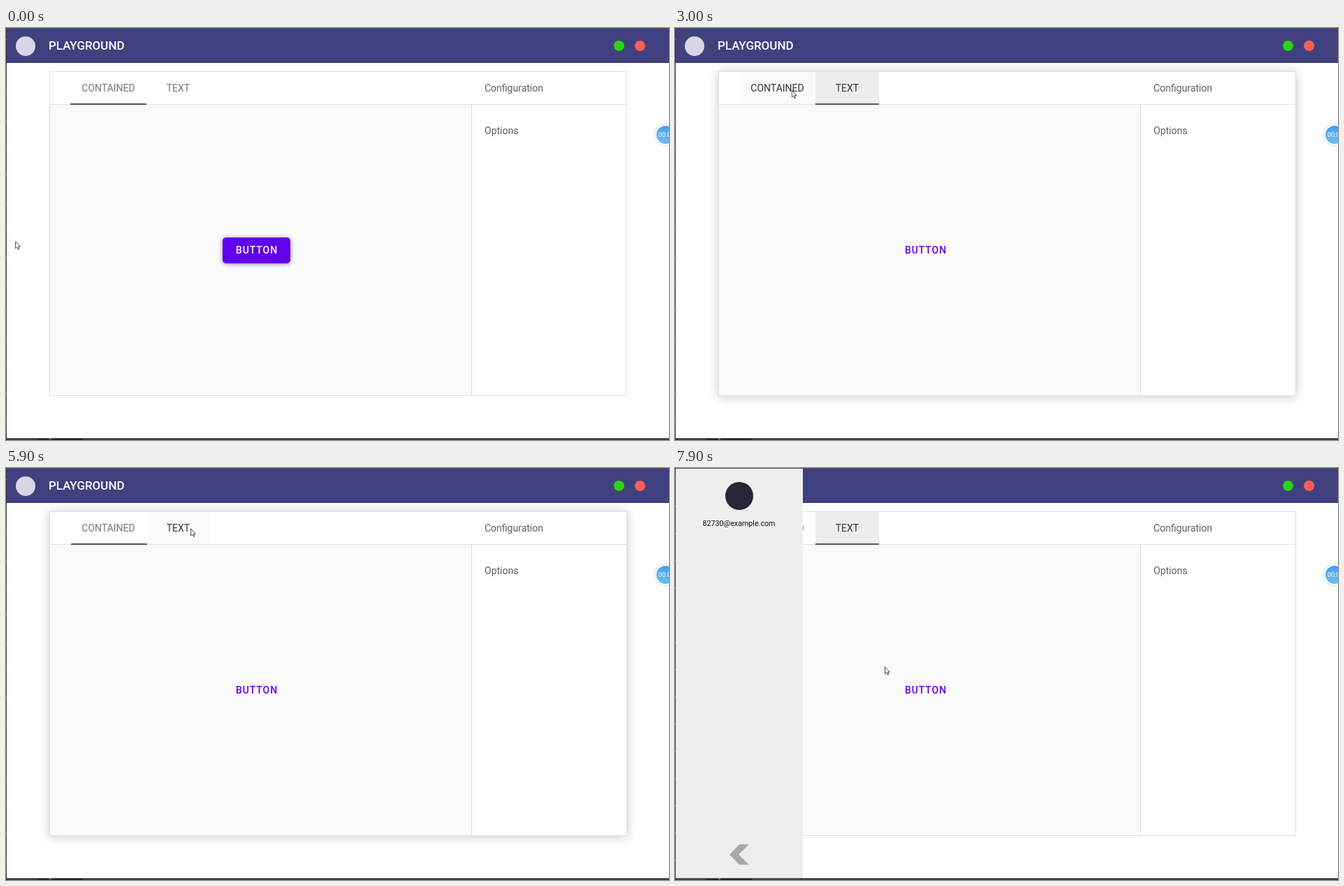
Animation, 949 px wide and 590 px high, one loop 8000 ms. Source, as an HTML page:

```html
<!DOCTYPE html>
<html lang="en">
<head>
<meta charset="utf-8">
<title>Button playground</title>
<style>
html, body { margin: 0; width: 100%; height: 100%; overflow: hidden; background: #fff; }
#stage { position: relative; width: 949px; height: 590px; overflow: hidden; background: #fff;
  font: 14px/20px Roboto, sans-serif; color: #5f5f5f; }
#stage * { position: absolute; box-sizing: border-box; white-space: nowrap; }
.dot { border-radius: 50%; }
#bar { left: 0; top: 0; width: 949px; height: 50px; background: #40407f;
  border-top: 1px solid #4b4b62; border-bottom: 1px solid #35356e; }
#title { left: 61px; top: 14.5px; font-size: 17px; font-weight: 500; line-height: 20px; color: #fff; }
#panel { left: 62px; top: 62px; width: 827px; height: 465px; background: #fff; border: 1px solid #e0e0e0; }
#view { left: 62px; top: 109px; width: 605px; height: 418px; background: #fafafa; border: 1px solid #e0e0e0; }
#rule { left: 666px; top: 109px; width: 222px; height: 1px; background: #e0e0e0; }
.tab { top: 63px; height: 46px; line-height: 46px; text-align: center; }
#line { top: 108px; height: 2px; background: #555; }
#button { left: 310px; top: 300px; width: 97px; height: 37px; border-radius: 5px; line-height: 37px;
  text-align: center; font-weight: 500; letter-spacing: .95px; text-indent: 1px; }
#clock { left: 929px; top: 138px; width: 30px; height: 30px; border: 2px solid #fff;
  background: linear-gradient(#4b9bf5, #6cc0f3); box-shadow: 0 0 3px #0005;
  color: #fff; font-size: 9px; line-height: 26px; text-indent: 3px; }
#drawer { left: 0; top: 1px; width: 183px; height: 586px; background: #eee; color: #111; }
#mail { left: 0; top: 69px; width: 183px; text-align: center; font-size: 10.7px; }
#edge { left: 0; top: 0; width: 1px; height: 590px;
  background: repeating-linear-gradient(#363636 0 15px, #777 15px 17px, #363636 17px 39px); }
#foot { left: 0; top: 587px; width: 949px; height: 3px; background: #3c3c3c; border-top: 1px solid #777; }
</style>
</head>
<body>
<div id="stage">
  <div id="bar"></div>
  <div class="dot" style="left:14px;top:12px;width:28px;height:28px;background:#d6d6e6"></div>
  <div id="title">PLAYGROUND</div>
  <div class="dot" style="left:870px;top:18px;width:15px;height:15px;background:#2bd414"></div>
  <div class="dot" style="left:900px;top:18px;width:15px;height:15px;background:#ff5f57"></div>
  <div id="panel"></div>
  <div id="view"></div>
  <div id="rule"></div>
  <div class="tab" id="tab0" style="left:92px;width:109px">CONTAINED</div>
  <div class="tab" id="tab1" style="left:201px;width:91px">TEXT</div>
  <div id="line"></div>
  <div style="left:685px;top:76px">Configuration</div>
  <div style="left:685px;top:137px">Options</div>
  <div id="button">BUTTON</div>
  <div class="dot" id="clock">00:0</div>
  <div id="foot">
    <div style="left:45px;top:0;width:65px;height:2px;background:#222"></div>
    <div style="left:62px;top:-1px;width:3px;height:2px;background:#2bd414"></div>
  </div>
  <div id="drawer">
    <div class="dot" style="left:72px;top:19px;width:40px;height:40px;background:#2a2438"></div>
    <div id="mail">82730@example.com</div>
    <svg style="left:78px;top:538px" width="28" height="29"><path d="M0 14.5 14 0H28L13 14.5 28 29H14Z" fill="#a8a8a8"/></svg>
  </div>
  <div id="edge"></div>
  <svg id="cursor" style="left:0;top:0" width="12" height="16">
    <path d="M.6.8V10.8L2.8 8.8 4.4 12.3 6 11.6 4.5 8.2H7.4Z" fill="#fff" stroke="#333" stroke-width=".9"/>
  </svg>
</div>
<script>
const LOOP = 8000;
const el = id => document.getElementById(id);
const mix = (a, b, k) => a + (b - a) * k;
// smooth 0..1 ramp starting at `start`
const ramp = (t, start, len = 250) => {
  const k = Math.min(1, Math.max(0, (t - start) / len));
  return k * k * (3 - 2 * k);
};

// time, x, y of the pointer tip
const path = [
  [0, 13, 305], [700, 13, 305], [950, 34, 316], [1100, 336, 189], [1250, 350, 170],
  [1800, 262, 92], [2300, 258, 90], [2700, 258, 90], [3100, 150, 88], [3450, 152, 90],
  [3700, 340, 300], [4000, 391, 330], [4600, 391, 330], [4900, 370, 315], [5500, 264, 86],
  [6300, 264, 86], [6900, 29, 26], [7080, 29, 26], [7300, 94, 286], [7900, 300, 284]
];
const clicks = [[2100, 1], [3400, 0], [5890, 1]];
const tabs = [[92, 201], [201, 292]];

function pointer(t) {
  const i = path.findIndex(p => p[0] > t);
  if (i < 0) return path[path.length - 1].slice(1);
  const [a, b] = [path[i - 1], path[i]], k = ramp(t, a[0], b[0] - a[0]);
  return [mix(a[1], b[1], k), mix(a[2], b[2], k)];
}

function draw(t) {
  const [x, y] = pointer(t);
  el('cursor').style.transform = `translate(${x}px, ${y}px)`;

  const click = clicks.filter(c => c[0] <= t).pop();
  const active = click ? click[1] : 0;
  const slide = click ? ramp(t, click[0]) : 1;
  const from = tabs[click ? 1 - active : 0], to = tabs[active];
  const left = mix(from[0], to[0], slide);
  el('line').style.left = left + 'px';
  el('line').style.width = mix(from[1], to[1], slide) - left + 'px';

  tabs.forEach(([l, r], i) => {
    const hover = x >= l && x < r && y > 62 && y < 110;
    const focus = click && active === i && t >= click[0] + 250;
    const style = el('tab' + i).style;
    style.background = focus ? '#ececec' : hover ? '#fafafa' : '#fff';
    style.color = focus || hover ? '#333' : '#757575';
  });

  const button = el('button').style;
  button.background = active ? 'none' : '#6200ee';
  button.color = active ? '#6200ee' : '#fff';
  button.boxShadow = active ? 'none' : '0 1px 6px rgba(0,0,0,.45)';

  const lift = ramp(t, 1000) - ramp(t, 6850);
  el('panel').style.boxShadow = `0 1px 14px rgba(0,0,0,${0.22 * lift})`;
  el('drawer').style.transform = `translateX(${-183 * (1 - ramp(t, 7200, 257))}px)`;
}

const begin = performance.now();
function tick() {
  draw((performance.now() - begin) % LOOP);
  requestAnimationFrame(tick);
}
tick();
</script>
</body>
</html>
```
